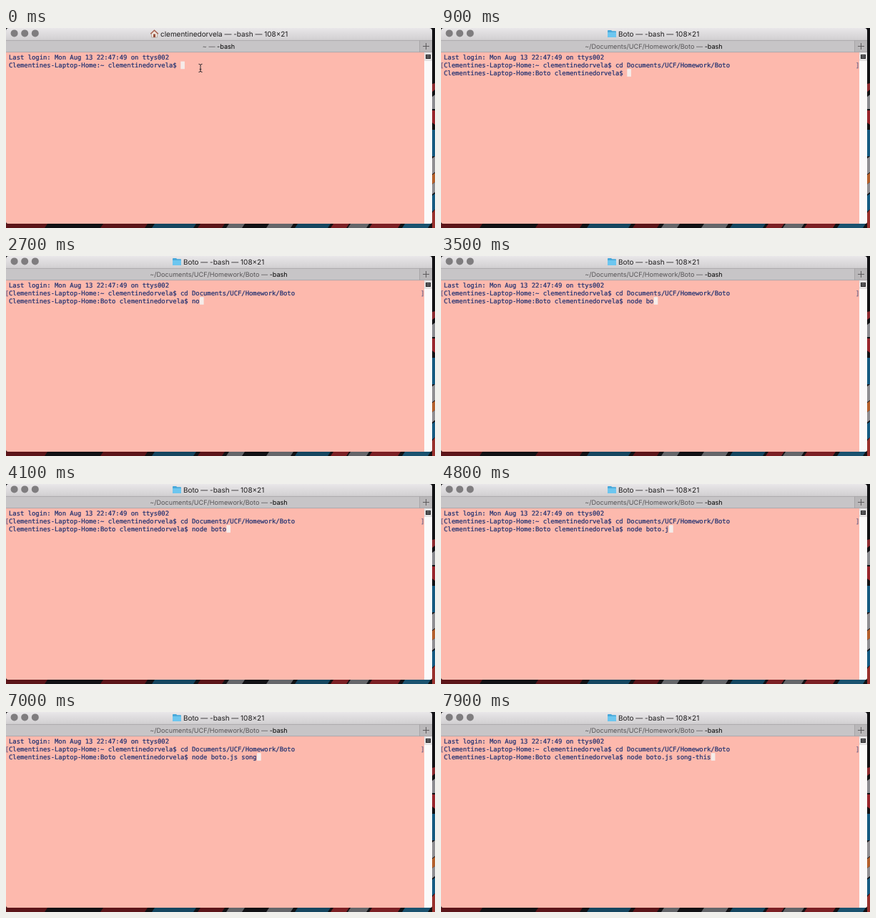
These frames come from a looping animation (600x279 px, 8000 ms). An HTML page:

```html
<!DOCTYPE html>
<html lang="en">
<head>
<meta charset="utf-8">
<title>Terminal</title>
<style>
  html, body { margin: 0; width: 100%; height: 100%; overflow: hidden; background: #111114; }
  svg { display: block; width: 600px; height: 279px; }
  text { white-space: pre; text-rendering: geometricPrecision; }
  .term { font: 8.87px "DejaVu Sans Mono", monospace; fill: #1c2f70; stroke: #1c2f70; stroke-width: .22px; }
  .bar { font-family: Inter, "Open Sans", sans-serif; fill: #1d1c1d; }
</style>
</head>
<body>
<svg viewBox="0 0 600 279">
  <defs>
    <linearGradient id="chrome" x2="0" y2="1">
      <stop stop-color="#e9e7e9"/><stop offset="1" stop-color="#d1cfd1"/>
    </linearGradient>
  </defs>

  <!-- desktop behind the window -->
  <rect width="600" height="279" fill="#111114"/>
  <g id="edge">
    <path d="M596 78l4-1v9l-4 3z" fill="#8c2a30"/>
    <path d="M596 96l4-3v20h-4z" fill="#8b8b90"/>
    <path d="M596 115h4v20l-4-3z" fill="#98252c"/>
    <path d="M596 142h4v37h-4z" fill="#145a80"/>
    <path d="M596 182l4-3v22l-4 3z" fill="#8f8e92"/>
    <path d="M596 205l4-3v13l-4 3z" fill="#b4602c"/>
    <path d="M596 218l4-3v14l-4 3z" fill="#8f8e92"/>
    <path d="M596 234l4-3v22l-4 3z" fill="#155b82"/>
    <path d="M596 258l4-5v26h-4z" fill="#98302c"/>
  </g>
  <g id="floor">
    <path d="M0 273H58l-4 6H0zM136 273h62l-4 6h-62zM272 273h34l-4 6h-34z" fill="#5c1519"/>
    <path d="M208 273h58l-4 6h-58zM408 273h46l-4 6h-46z" fill="#154660"/>
    <path d="M312 273h22l-4 6h-22zM368 273h34l-4 6h-34zM482 273h26l-4 6h-26z" fill="#65666a"/>
    <path d="M458 273h22l-4 6h-22zM512 273h40l-4 6h-40z" fill="#7c2024"/>
    <path d="M558 273h36l-4 6h-36z" fill="#1a526f"/>
  </g>

  <!-- window -->
  <path d="M0 34H596V270q0 3-3 3H3q-3 0-3-3z" fill="#fdb9ad"/>
  <path d="M585 34h11v236q0 3-3 3h-8z" fill="#fbfafa"/>
  <path d="M0 17V4q0-4 4-4h588q4 0 4 4v13z" fill="url(#chrome)"/>
  <rect y="17" width="596" height="17" fill="#c7c5c7"/>
  <rect x="578" y="17" width="18" height="17" fill="#b9b7b9"/>
  <path d="M0 17.4H596M0 33.6H596M578.5 17V34" stroke="#a5a3a5" stroke-width=".8"/>
  <path d="M583 25.5h9M587.5 21v9" stroke="#5d5b5d"/>
  <rect x="585" y="34" width="11" height="12" fill="#e4e2e3"/>
  <rect x="587.5" y="37.5" width="6" height="5" fill="#77777a" stroke="#29292b"/>
  <path d="M588 39.5h5M588 41.2h5" stroke="#29292b" stroke-width=".8"/>
  <g fill="#7f7d7f">
    <circle cx="11.6" cy="7.4" r="5"/><circle cx="26.2" cy="7.4" r="5"/><circle cx="40.8" cy="7.4" r="5"/>
  </g>

  <g id="house">
    <path d="M203.5 7.5v5.5h8V7.5l-4-4z" fill="#efe5dd" stroke="#a78d82" stroke-width=".6"/>
    <path d="M202.2 8.2l5.3-5 5.3 5" fill="none" stroke="#a8604f" stroke-width="1.5"/>
    <rect x="206" y="8.5" width="3" height="4.5" fill="#96503f"/>
  </g>
  <g id="folder">
    <path d="M233 4q0-1 1-1h4l1.3 1.3H244q1 0 1 1V12q0 1-1 1h-10q-1 0-1-1z" fill="#49a9da"/>
    <path d="M233 6h12v6q0 1-1 1h-10q-1 0-1-1z" fill="#6dc6ef"/>
  </g>
  <text id="title" class="bar" y="11.7" font-size="9.95"/>
  <text class="bar" x="297.5" y="29" font-size="9.1" text-anchor="middle"><tspan id="path" fill="#565456"/><tspan fill="#000">-bash</tspan></text>

  <!-- terminal text -->
  <rect id="cursor" width="5.6" height="10.6" fill="#f5ece9"/>
  <text class="term" x="4" y="44.2">Last login: Mon Aug 13 22:47:49 on ttys002</text>
  <text id="row1" class="term" x="4" y="54.9"/>
  <text id="row2" class="term" x="4" y="65.5"/>
  <g id="marks" opacity=".65">
    <text class="term" x="-1.3" y="54.9">[</text>
    <text class="term" x="580" y="54.9">]</text>
  </g>
  <path id="beam" d="M269.5 50.3q2.3 0 2.5 1.5q.2-1.5 2.5-1.5M272 51.5v9M269.5 61.5q2.3 0 2.5-1.5q.2 1.5 2.5 1.5M270.7 57.5h2.6" fill="none" stroke="#29252a"/>
</svg>

<script>
const $ = id => document.getElementById(id);
const show = (id, on) => $(id).style.display = on ? '' : 'none';

const LOOP = 8000, CELL = 5.34, ROW = 10.6;
const user = 'clementinedorvela', host = 'Clementines-Laptop-Home';
const prompt = dir => `${host}:${dir} ${user}$ `;
const cd = 'cd Documents/UCF/Homework/Boto', cdAt = 300, enterAt = 700;
const command = 'node boto.js song-this';
// when each character of the command is typed
const keys = [2400, 2600, 2800, 3000, 3100, 3300, 3400, 3700, 3900, 4300, 4700,
  4900, 5200, 6200, 6400, 6600, 6800, 7100, 7300, 7500, 7600, 7800];

function draw(t) {
  const moved = t >= enterAt;
  const row1 = prompt('~') + (t >= cdAt ? cd : '');
  const row2 = moved ? prompt('Boto') + command.slice(0, keys.filter(k => k <= t).length) : '';
  $('row1').textContent = row1;
  $('row2').textContent = row2;
  $('cursor').setAttribute('x', 4 + CELL * (moved ? row2 : row1).length);
  $('cursor').setAttribute('y', 46.6 + (moved ? ROW : 0));
  $('title').textContent = `${moved ? 'Boto' : user} — -bash — 108×21`;
  $('title').setAttribute('x', moved ? 248 : 216);
  $('path').textContent = `${moved ? '~/Documents/UCF/Homework/Boto' : '~'} — `;
  show('house', !moved);
  show('folder', moved);
  show('marks', moved);
  show('beam', t < cdAt);
}

const start = performance.now();
function tick() {
  draw((performance.now() - start) % LOOP);
  requestAnimationFrame(tick);
}
tick();
</script>
</body>
</html>
```
